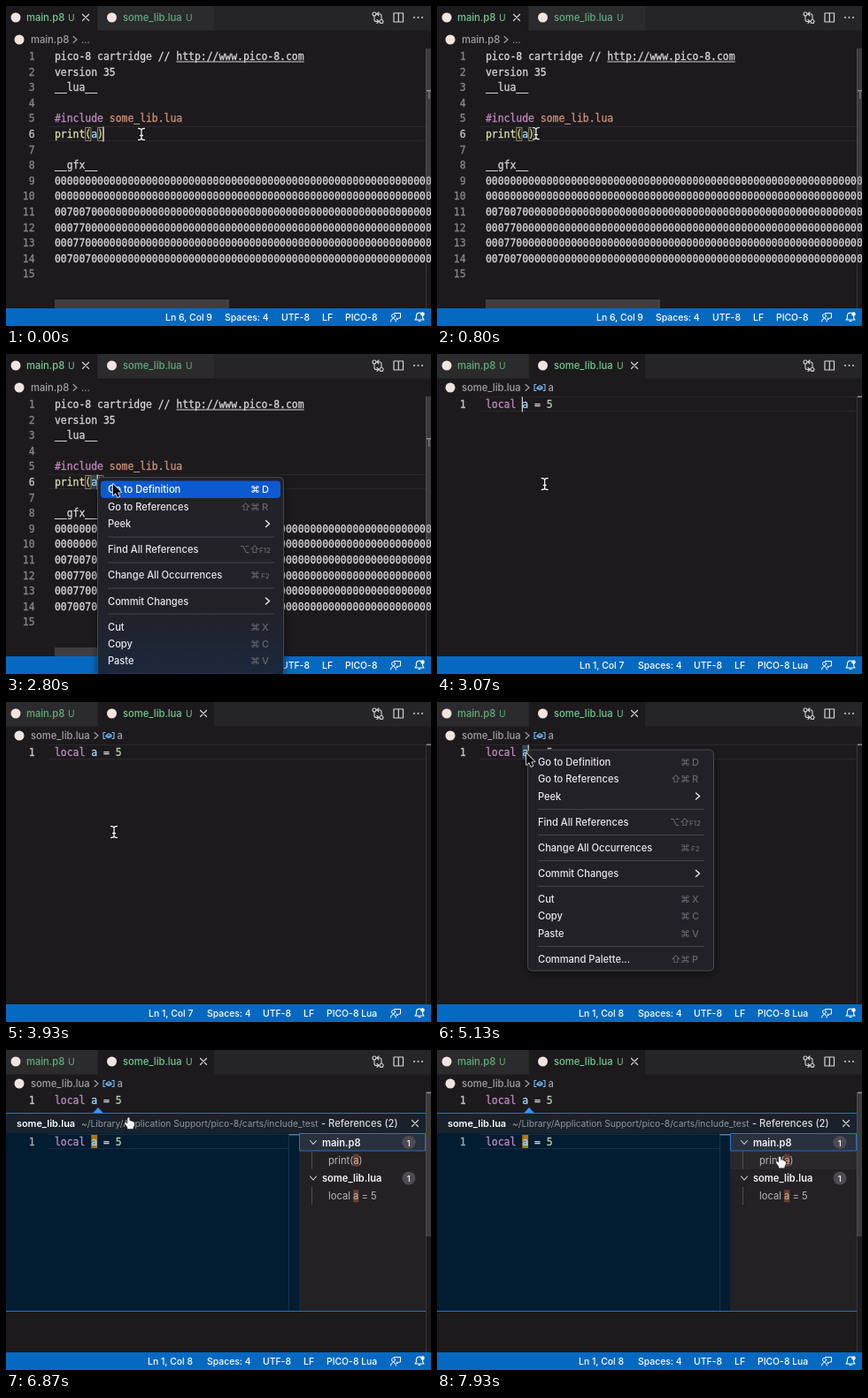
These frames come from a looping animation (480 by 362 pixels, 8000 ms). An HTML page with a canvas:

```html
<!DOCTYPE html>
<html lang="en">
<head>
<meta charset="utf-8">
<title>Go to definition and references</title>
<style>
html, body { margin: 0; width: 100%; height: 100%; overflow: hidden; background: #1c1a1c; }
canvas { display: block; width: 100vw; height: 100vh; }
</style>
</head>
<body>
<canvas></canvas>
<script>
const canvas = document.querySelector('canvas');
const c = canvas.getContext('2d');
const ratio = window.devicePixelRatio || 1;
canvas.width = 480 * ratio;
canvas.height = 362 * ratio;
c.scale(ratio, ratio);

const LOOP = 8000, SWITCH = 3000, PEEK = 6270;
const ROW = 17.6, LEFT = 55, CHAR = 6.87;
const UI = 'Inter, "DejaVu Sans", sans-serif';
const MONO = '11.41px "DejaVu Sans Mono", monospace';
const C = {
  bg: '#1c1a1c', bar: '#252426', tab: '#2b2a2c', status: '#0669c1',
  text: '#d6d4d6', dim: '#a3a1a4', green: '#73c991', purple: '#c08abf',
  orange: '#ce9178', yellow: '#dcdcaa', gold: '#e3d079', blue: '#9cdcfe',
  number: '#b5cea8', line: '#2a282b', edge: '#2672c8'
};

const LUA = [['local ', C.purple], ['a', C.blue], [' = '], ['5', C.number]];
const gfx = start => [[start.padEnd(64, '0')]];
const CARTRIDGE = [
  [['pico-8 cartridge // http://www.pico-8.com']],
  [['version 35']], [['__lua__']], [],
  [['#include', C.purple], [' some_lib.lua', C.orange]],
  [['print', C.yellow], ['(', C.gold], ['a', C.blue], [')', C.gold]],
  [], [['__gfx__']],
  gfx(''), gfx(''), gfx('007007'), gfx('00077'), gfx('00077'), gfx('007007'), []
];

// label, vertical offset, then shortcut pieces as [text, x offset]
const CMD = ['⌘', 173], SHIFT = ['⇧', 162];
const ITEMS = [
  ['Go to Definition', 14, CMD, ['D', 186]],
  ['Go to References', 33.5, SHIFT, CMD, ['R', 186]],
  ['Peek', 53],
  ['Find All References', 82, ['⌥', 161], ['⇧', 172], ['F12', 183]],
  ['Change All Occurrences', 111, CMD, ['F2', 185]],
  ['Commit Changes', 140.5],
  ['Cut', 169.5, CMD, ['X', 186]],
  ['Copy', 188.5, CMD, ['C', 186]],
  ['Paste', 208, CMD, ['V', 186]],
  ['Command Palette...', 237, SHIFT, CMD, ['P', 186]]
];
const SEPARATORS = [67.5, 96.5, 125.5, 154.5, 222.5];
const MENUS = [
  { open: 1250, close: 2900, x: 103, y: 139 },
  { open: 4850, close: 5800, x: 102, y: 53.5 }
];
const POINTER = [
  [0, 153, 145], [200, 153, 145], [1050, 101, 144], [1900, 101, 144], [2400, 120, 147],
  [3300, 122, 147], [4050, 122, 147], [4700, 101, 58], [5250, 101, 58],
  [5600, 124, 78], [6750, 124, 78], [7550, 388, 125], [LOOP, 388, 125]
];

function box(x, y, w, h, fill, border, radius = 0) {
  c.beginPath();
  c.roundRect(x, y, w, h, radius);
  if (fill) { c.fillStyle = fill; c.fill(); }
  if (border) { c.strokeStyle = border; c.lineWidth = 1; c.stroke(); }
}

function label(text, x, y, color = C.text, size = 11.2, weight = 400) {
  c.font = `${weight} ${size}px ${UI}`;
  c.fillStyle = color;
  c.fillText(text, x, y + 4);
}

// A hairline outline gives the code its medium weight.
function code(parts, x, y) {
  c.font = MONO;
  c.lineWidth = .3;
  for (const [text, color = C.text] of parts) {
    c.fillStyle = c.strokeStyle = color;
    c.fillText(text, x, y + 4);
    c.strokeText(text, x, y + 4);
    x += c.measureText(text).width;
  }
}

function path(d, x, y, stroke, width = 1.1, fill) {
  const shape = new Path2D(d);
  c.save();
  c.translate(x, y);
  c.lineJoin = c.lineCap = 'round';
  c.lineWidth = width;
  if (stroke) { c.strokeStyle = stroke; c.stroke(shape); }
  if (fill) { c.fillStyle = fill; c.fill(shape); }
  c.restore();
}

function dot(x, y, r, color) {
  c.fillStyle = color;
  c.beginPath();
  c.arc(x, y, r, 0, 7);
  c.fill();
}

const fileIcon = (x, y) => dot(x, y, 5.5, '#f1e4de');
const cross = (x, y) => path('M-3.5-3.5L3.5 3.5M3.5-3.5L-3.5 3.5', x, y, C.text, 1.2);
const chevron = (x, y, color = C.text, width = 1.1) => path('M-2-3.5L2 0L-2 3.5', x, y, color, width);

function pointerAt(t) {
  const i = Math.max(1, POINTER.findIndex(p => p[0] > t));
  const [t0, x0, y0] = POINTER[i - 1], [t1, x1, y1] = POINTER[i];
  const u = (t - t0) / (t1 - t0), e = u * u * (3 - 2 * u);
  return [x0 + (x1 - x0) * e, y0 + (y1 - y0) * e];
}

function drawTabs(lua) {
  box(0, 0, 480, 27.5, C.bar);
  box(0, 0, 103, 27.5, lua ? C.tab : C.bg);
  box(104, 0, 131, 27.5, lua ? C.bg : C.tab);
  fileIcon(11, 13);
  fileIcon(119.5, 13);
  const shade = active => active ? C.green : '#5fb07d';
  label('main.p8', 23, 13, shade(!lua), 11.2, 500);
  label('U', 70, 13, shade(!lua), 10.2);
  label('some_lib.lua', 132, 13, shade(lua), 11.2, 500);
  label('U', 203, 13, shade(lua), 10.2);
  cross(lua ? 223 : 90, 13);

  path('M-2-4a2 2 0 1 1-4 0a2 2 0 1 1 4 0M6 4.5a2 2 0 1 1-4 0a2 2 0 1 1 4 0' +
    'M-4-2V2.5Q-4 4.5-2 4.5H1M-1 2.5L1 4.5L-1 6.5M4 2.5V-2Q4-4 2-4H-1M1-6L-1-4L1-2', 420, 13, C.text);
  path('M-5-5H5.5V5H-5ZM.3-5V5', 443, 13, C.text, 1.2);
  for (const x of [461, 465.5, 470]) dot(x, 13, 1, C.text);

  fileIcon(15, 38);
  label(lua ? 'some_lib.lua' : 'main.p8', 28, 38, C.dim, 11.2, 500);
  chevron(lua ? 102 : 78, 38, C.dim);
  if (lua) {
    path('M-4-3.5H-6V3.5H-4M4-3.5H6V3.5H4M-3 0L0-2.2L3-.8V1.2L0 2.6L-3 1.4ZM-3 0L0 1L3-.8', 116, 38, '#75beff', 1.1);
    label('a', 125.5, 38, C.dim, 11.2, 500);
  } else label('...', 85, 38, C.dim);
}

function drawStatus(lua, line, col) {
  box(0, 342, 480, 20, C.status);
  const texts = [`Ln ${line}, Col ${col}`, 'Spaces: 4', 'UTF-8', 'LF', lua ? 'PICO-8 Lua' : 'PICO-8'];
  const xs = lua ? [col === 7 ? 161 : 160, 227, 290, 336, 362] : [180, 247, 311, 357, 383];
  texts.forEach((text, i) => label(text, xs[i], 352, '#fff', 10.4, 500));
  path('M-2-4.5H5V1H3L1 3V1M-1-1.5a2 2 0 1 1-4 0a2 2 0 1 1 4 0M-6 5Q-6 1.5-3 1.5Q0 1.5 0 5', 440.5, 352, '#fff', 1);
  path('M-5 3H5L3.6 1V-2Q3-5 0-5Q-3-5-3.6-2V1ZM-1 4.5H1', 467, 352, '#fff', 1.1);
  dot(470.5, 348.5, 2.2, '#fff');
}

function drawScrollbar(lua, peek) {
  box(474, 48, 1, 294, '#38363a');
  if (!lua || peek) box(474, 48, 6, 163, 'rgba(121,121,121,.35)');
  box(475, lua ? 47.5 : 95, 5, 1.6, '#8c8a8d');
  if (!lua) {
    box(477, 96, 1.5, 9, '#77757a');
    box(55, 332, 197, 10, '#403e41');
  }
}

function drawEditor(lua, line, col, selected, caretOn, peek) {
  const y = 57 + (line - 1) * ROW;
  if (!peek) {
    box(48, y - 9, 426, 1, C.line);
    box(48, y + 7, 426, 1, C.line);
  }
  if (selected) box(LEFT + CHAR * 6, y - 8, CHAR, 16, '#344657');
  if (!lua) for (const i of [5, 7]) box(LEFT + i * CHAR + .3, y - 7.5, CHAR - .6, 15, '#22251d', '#85816f');

  (lua ? [LUA] : CARTRIDGE).forEach((parts, i) => {
    const rowY = 57 + i * ROW;
    const n = String(i + 1);
    code([[n, i + 1 === line ? '#c6c6c6' : '#858585']], 32.5 - n.length * CHAR, rowY);
    code(parts, LEFT, rowY);
  });
  if (!lua) box(LEFT + 20 * CHAR, 62.5, 21 * CHAR, 1, C.text);
  if (caretOn) box(LEFT + (col - 1) * CHAR - .5, y - 8.5, 1.3, 17, '#d0ced0');
}

function drawPeek(mouse) {
  path('M-6 0L0-6.5L6 0Z', 104, 71.5, null, 1, '#3794ff');
  box(0, 72, 474, 223, '#18212c');
  box(0, 71, 474, 1, C.edge);
  label('some_lib.lua', 12, 83, '#fff', 10.9, 600);
  label('~/Library/Application Support/pico-8/carts/include_test', 85, 83, '#96959a', 10.22);
  label('- References (2)', 356, 83, '#dddbde', 11.15, 500);
  cross(462, 83);

  box(0, 94, 331, 201, '#021c31');
  box(48, 95, 271, 1, '#152e42');
  box(48, 111, 271, 1, '#152e42');
  box(319, 94, 1, 201, '#173148');
  box(319.5, 95, 11.5, 1.5, '#65788a');
  box(LEFT + CHAR * 6, 96, CHAR, 15, '#a8751c');
  code([['1', '#a5a7aa']], 32.5 - CHAR, 104);
  code(LUA, LEFT, 104);

  box(331, 94, 143, 201, '#232124');
  box(331.5, 94.5, 142, 19.5, '#28313c', C.edge);
  if (mouse[0] > 331 && mouse[1] > 115 && mouse[1] < 135) box(331, 115, 143, 20, '#2a282b');
  ['main.p8', 'some_lib.lua'].forEach((name, i) => {
    const y = 104.5 + i * 40.5;
    path('M-3.5-2L0 2L3.5-2', 347, y, C.text);
    label(name, 357, y, '#f4f2f5', 11.1, 600);
    dot(455, y, 7.5, '#4d4b4f');
    label('1', 452.8, y, '#fff', 9.5, 500);
    box(345, y + 10, 1, 20, '#504e52');
  });
  c.font = `11.2px ${UI}`;
  [['print(', 'a', ')', 124.8], ['local ', 'a', ' = 5', 165.2]].forEach(([before, match, after, y]) => {
    const x = 364 + c.measureText(before).width;
    const w = c.measureText(match).width;
    box(x, y - 7, w, 14, '#6a3d2c');
    label(before, 364, y, '#b8b6b9');
    label(match, x, y, '#c4b5ac');
    label(after, x + w, y, '#b8b6b9');
  });
  box(0, 295, 474, 1, C.edge);
}

function drawMenu({ x, y }, mouse, alpha) {
  c.save();
  c.globalAlpha = alpha;
  const tint = c.createLinearGradient(0, 290, 0, 362);
  tint.addColorStop(0, '#232128');
  tint.addColorStop(1, y > 100 ? '#1a283c' : '#232128');
  c.shadowColor = 'rgba(0,0,0,.55)';
  c.shadowBlur = 9;
  c.shadowOffsetY = 3;
  box(x, y, 211, 251, tint, null, 5);
  c.shadowColor = 'transparent';
  box(x + .5, y + .5, 210, 250, null, '#49474f', 5);
  for (const s of SEPARATORS) box(x + 12, y + s, 188, 1, '#45434b');
  for (const [text, dy, ...keys] of ITEMS) {
    const cy = y + dy;
    const hover = mouse[0] > x + 4 && Math.abs(mouse[1] - cy) < 9.75;
    if (hover) box(x + 4, cy - 9.5, 203, 19.4, '#0d59d0', null, 4);
    label(text, x + 12, cy, hover ? '#fff' : '#e9e7eb', 11.1, 500);
    if (!keys.length) chevron(x + 192.5, cy, '#e6e4e8', 1.5);
    for (const [key, dx] of keys)
      label(key, x + dx, cy, hover ? '#fff' : '#67656d', key[0] === 'F' ? 8 : 11, 500);
  }
  c.restore();
}

const ARROW = 'M0 0V13L3 10.2L5.2 15L7.3 14L5.2 9.5H9.4Z';
const BEAM = 'M-3.5-6.5Q0-6.5 0-4.5Q0-6.5 3.5-6.5M0-4.5V4.5M-3.5 6.5Q0 6.5 0 4.5Q0 6.5 3.5 6.5M-1.5 1.5H1.5';
const HAND = 'M-2 6L-5 1.5Q-5.5 0-4 0L-2 1.5V-4Q-2-5.5-.8-5.5Q.4-5.5 .4-4V-1.5Q1.6-2.5 2.4-1Q3.6-1.8 4.2-.3Q6-.6 6 1.2Q6 4 4.5 6V7.5H-2Z';

function drawPointer([x, y], kind) {
  if (kind === 'arrow') path(ARROW, x, y, '#f4f2f4', 1.6, '#050505');
  else if (kind === 'hand') path(HAND, x, y + 1, '#111', 1, '#f4f2f4');
  else {
    path(BEAM, x, y, '#111', 3.2);
    path(BEAM, x, y, '#f4f2f4', 1.3);
  }
}

function draw(t) {
  const lua = t >= SWITCH, peek = t >= PEEK;
  const mouse = pointerAt(t);
  const menu = MENUS.find(m => t >= m.open && t < m.close + 130);
  const line = lua ? 1 : 6;
  const col = lua ? (t < 4800 ? 7 : 8) : (t < 1200 ? 9 : 8);
  const blinkStart = t < SWITCH ? 0 : t < 4800 ? SWITCH : 5800;
  const caretOn = !peek && (menu || (t - blinkStart + 1000) % 1000 < 500);

  box(0, 0, 480, 362, C.bg);
  drawEditor(lua, line, col, menu, caretOn, peek);
  drawScrollbar(lua, peek);
  if (peek) drawPeek(mouse);
  drawTabs(lua);
  drawStatus(lua, line, col);
  if (menu) drawMenu(menu, mouse, Math.min(1, 1 - (t - menu.close) / 130));

  const overHand = peek && (mouse[1] < 94 || mouse[0] > 331);
  drawPointer(mouse, menu && t < menu.close ? 'arrow' : overHand ? 'hand' : 'beam');
}

function frame(now) {
  draw(Math.floor((now % LOOP) * .015 + .1) / .015 % LOOP);
  requestAnimationFrame(frame);
}
requestAnimationFrame(frame);
</script>
</body>
</html>
```
